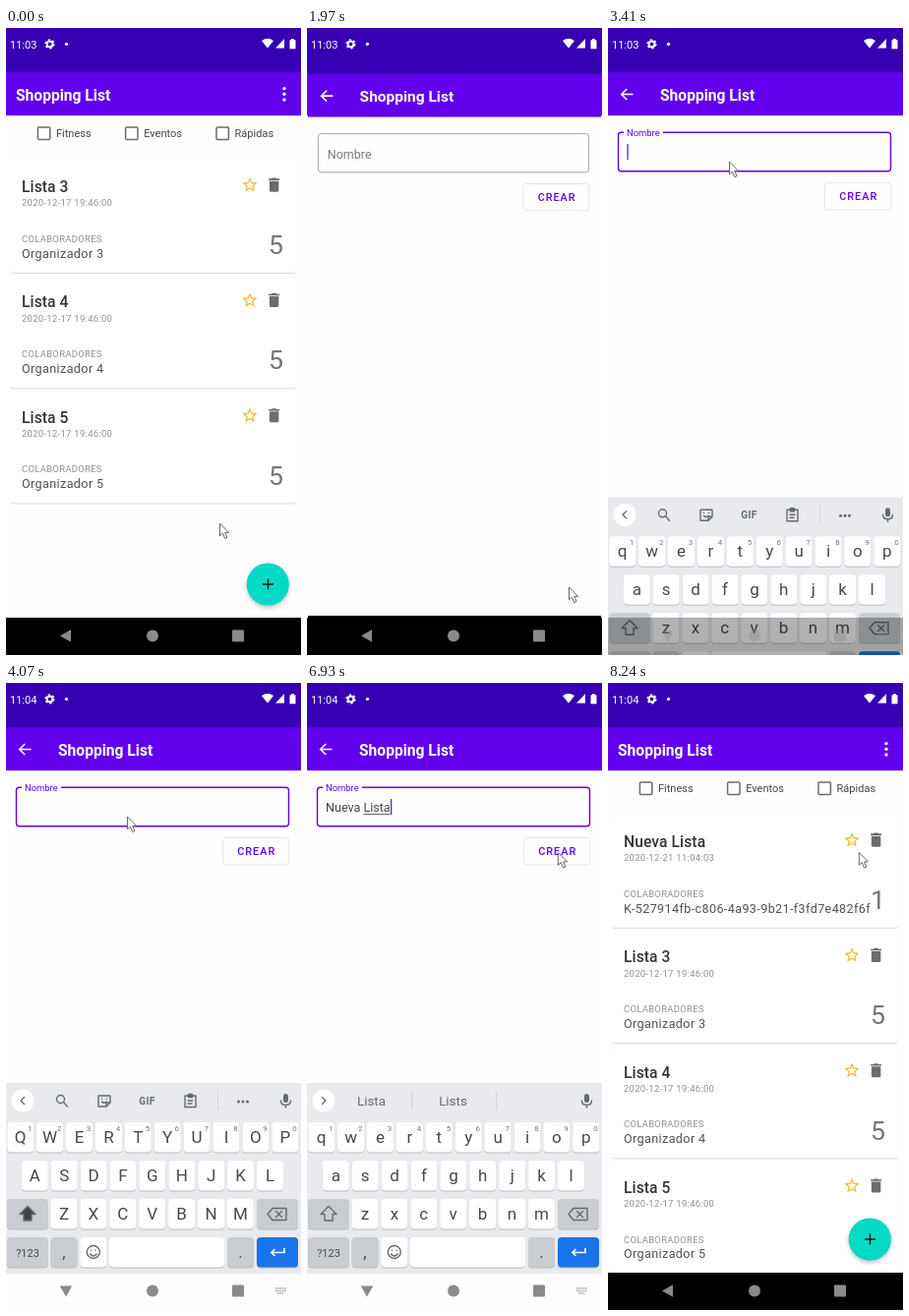
These frames come from a looping animation (300x638 px, 9320 ms). An HTML page:

```html
<!DOCTYPE html>
<html lang="es">
<head>
<meta charset="utf-8">
<title>Shopping List</title>
<style>
html, body { margin: 0; height: 100%; overflow: hidden; background: #000; }
svg { display: block; width: 100vw; height: 100vh; }
text { font-family: Roboto, sans-serif; white-space: pre; }
.scale { transform-origin: 150px 319px; }
.title { font-size: 15.6px; font-weight: 700; fill: #fff; }
.name { font-size: 15.6px; font-weight: 500; letter-spacing: .1px; fill: #333; }
.cap { font-size: 9.43px; letter-spacing: .314px; fill: #8f8f8f; }
.body { font-size: 12.57px; letter-spacing: .393px; fill: #505050; }
.num { font-size: 26.7px; fill: #757575; text-anchor: middle; }
.check { font-size: 11px; fill: #444; }
.card { fill: #fff; filter: drop-shadow(0 1px .7px #0002); }
.key rect { filter: drop-shadow(0 1px .4px #0003); }
.key text { font-size: 17px; fill: #45484c; text-anchor: middle; }
.key .hint { font-size: 8px; fill: #777; }
.sug { font-size: 13.4px; fill: #666a6f; text-anchor: middle; }
.line { fill: none; stroke: #666a6f; stroke-width: 1.4; stroke-linecap: round; stroke-linejoin: round; }
</style>
</head>
<body>
<svg id="stage" viewBox="0 0 300 638"></svg>
<script>
const LOOP = 9320, PITCH = 117.3;
const VIOLET = '#6200ee';
const stage = document.getElementById('stage');

const text = (cls, x, y, s, more = '') => `<text class="${cls}" x="${x}" y="${y}" ${more}>${s}</text>`;
const rect = (x, y, w, h, fill, more = '') =>
  `<rect x="${x}" y="${y}" width="${w}" height="${h}" fill="${fill}" ${more}/>`;
const circle = (x, y, r, fill, more = '') => `<circle cx="${x}" cy="${y}" r="${r}" fill="${fill}" ${more}/>`;
const path = (d, more = '') => `<path d="${d}" ${more}/>`;

// Window backdrop: status bar, app bar, page and navigation bar
const navBar = rect(0, 600, 300, 38, '#000');
const frame = rect(0, 0, 300, 638, '#fefefe') +
  rect(0, 45, 300, 44, VIOLET, 'style="filter:drop-shadow(0 .8px .8px #0003)"') +
  rect(0, 0, 300, 45.2, '#3700b3') + navBar;

const star = 'M22 9.24l-7.19-.62L12 2 9.19 8.63 2 9.24l5.46 4.73L5.82 21 12 17.27 18.18 21l-1.63-7.03zM12 15.4l-3.76 2.27 1-4.28-3.32-2.88 4.38-.38L12 6.1l1.71 4.04 4.38.38-3.32 2.88 1 4.28z';
const bin = 'M6 19c0 1.1.9 2 2 2h8c1.1 0 2-.9 2-2V7H6zM19 4h-3.5l-1-1h-5l-1 1H5v2h14z';

const card = (row, name, date, who, n) => `<g transform="translate(0 ${row * PITCH})">` +
  rect(4, 136, 291, 113, '#fff', 'rx="3" class="card"') +
  text('name', 16, 167, name) + text('cap', 16, 181.3, date) +
  text('cap', 16, 217.8, 'COLABORADORES') + text('body', 16, 233.6, who) + text('num', 274.5, 230, n) +
  path(star, 'fill="#f7b731" transform="translate(238.8 150.4) scale(.765)"') +
  path(bin, 'fill="#6c6c6c" transform="translate(263.2 150.2) scale(.786)"') + '</g>';

const check = (x, s) => rect(x, 101, 12.4, 12.4, 'none', 'rx="1" stroke="#6c6c6c" stroke-width="1.5"') +
  text('check', x + 18.6, 111.2, s);

const listWindow = `<g id="list" class="scale">${frame}` +
  text('title', 10, 73.5, 'Shopping List') +
  [61.6, 67.3, 73].map(y => circle(283, y, 1.7, '#fff')).join('') +
  check(32.4, 'Fitness') + check(121.6, 'Eventos') + check(214, 'Rápidas') +
  `<clipPath id="page"><rect y="90" width="300" height="510"/></clipPath><g clip-path="url(#page)">
  <g id="fresh">${card(0, 'Nueva Lista', '2020-12-21 11:04:03', 'K-527914fb-c806-4a93-9b21-f3fd7e482f6f', 1)}</g><g id="rows">` +
  [3, 4, 5].map((n, i) => card(i, 'Lista ' + n, '2020-12-17 19:46:00', 'Organizador ' + n, 5)).join('') +
  `</g></g>${rect(0, 407, 300, 193, '#fefefe', 'id="cut"')}<g id="fab">` +
  circle(266.3, 566, 21.6, '#03dac5', 'id="fabDisc"') + circle(266.3, 566, 0, '#fff', 'id="fabWave"') +
  path('M261 566h11M266.5 560.5v11', 'stroke="#111" stroke-width="1.3"') + '</g></g>';

// Keyboard
const key = (x, y, w, fill, s = '', hint = '') => `<g class="key">${rect(x - w / 2, y - 15, w, 30.5, fill, 'rx="4"')}` +
  text('', x, y + 5.8, s) + (hint && text('hint', x + 9.6, y - 6.5, hint)) + '</g>';
const row = (letters, x, y, hints = '') =>
  [...letters].map((c, i) => key(x + i * 29.9, y, 27, '#fff', c, hints[i])).join('');
const GREY = '#c9cdd2';

const tools = `<g id="tools" class="line">
  <circle cx="55.5" cy="423.5" r="4"/><path d="M58.5 426.5l4 4.5M94 420h12v7l-4 4h-8zM106 427h-4v4M97.5 426q2 2.5 4.5 0M97.5 423v.1M102.5 423v.1"/>
  <path d="M182 420h11v11.5h-11zM185.5 418.5h4v3h-4zM185 425h5M185 428h4"/>
  <path d="M215.5 416v18" stroke="#d5d8dc" stroke-width="1"/>
  <text x="143.5" y="429" text-anchor="middle" font-size="10" font-weight="700" fill="#666a6f" stroke="none" letter-spacing=".5">GIF</text>
  ${[236.5, 241, 245.5].map(x => circle(x, 426, 1.5, '#666a6f', 'stroke="none"')).join('')}</g>`;

const keyboard = `<g id="kb">${rect(0, 407, 300, 194, '#e8eaed')}${rect(0, 601, 300, 260, '#fdfdfd')}` +
  circle(17, 425, 11.5, '#fff') + path('', 'id="chevron" class="line"') + tools +
  `<g id="bar">${path('M106.5 416v18M192.5 416v18', 'stroke="#cfd2d6"')}` +
  [65.5, 148.5, 234].map(x => text('sug', x, 430, '')).join('') + '</g>' +
  rect(282, 418, 5, 9, '#666a6f', 'rx="2.5"') + path('M279.5 425q0 4.5 5 4.5t5-4.5M284.5 429.5v2.5', 'class="line"') +
  '<g id="letters">' + row('qwertyuiop', 14.7, 462, '1234567890') + row('asdfghjkl', 29.3, 501) + row('zxcvbnm', 59, 540) + '</g>' +
  key(22, 540, 42, GREY) + path('M22 532.5l-8 8h4v6.5h8v-6.5h4z', 'id="shift" class="line"') +
  key(276, 540, 42, GREY) + path('M271 534.5h14v12h-14l-5-6zM274.5 537.5l6 6M280.5 537.5l-6 6', 'class="line"') +
  `<g class="key">${rect(1, 564, 42, 30.5, GREY, 'rx="4"')}<text x="22" y="583.5" style="font-size:11px">?123</text></g>` +
  key(59, 579, 27, GREY, ',') + key(88.8, 579, 27, '#fff') +
  `<g class="line">${circle(88.8, 579, 6.5, 'none')}<path d="M85.5 581q3.3 4 6.6 0M86.5 577v.3M91 577v.3"/></g>` +
  key(163.5, 579, 117, '#fff') + key(238.5, 579, 27, GREY, '.') + key(276, 579, 42, '#1a73e8') +
  path('M283 575v4.5h-13M273.5 576l-3.6 3.5 3.6 3.5', 'fill="none" stroke="#fff" stroke-width="1.7"') + '</g>';

const addWindow = `<g id="add" class="scale">${frame}` +
  path('M25.5 67.5H14M19.2 62L13.7 67.5l5.5 5.5', 'fill="none" stroke="#fff" stroke-width="1.6"') +
  text('title', 53, 73.5, 'Shopping List') +
  rect(10.5, 106.2, 277, 39.5, 'none', 'rx="3" id="field"') + rect(0, 104, 0, 5, '#fefefe', 'id="gap"') +
  text('', 0, 0, 'Nombre', 'id="label" font-size="12.57"') +
  text('', 19, 131, '', 'id="input" font-size="12.57" fill="#444"') +
  path('', 'id="under" stroke="#555" stroke-width=".9"') + rect(0, 118, 1.2, 16, '#4a1fb0', 'id="caret"') +
  rect(220.5, 157.5, 67.3, 27.5, '#fefefe', 'rx="3" stroke="#e6e6e8"') +
  rect(221, 158, 66.3, 26.5, VIOLET, 'rx="3" id="press"') +
  text('', 235.3, 175.4, 'CREAR', `font-size="10.9" font-weight="500" letter-spacing=".95" fill="${VIOLET}"`) +
  keyboard + rect(0, 600, 300, 38, '#000', 'id="shade"') + '</g>';

const system = text('', 4, 20.6, '', 'id="clock" font-size="11" fill="#fff"') +
  circle(44.5, 16.3, 2.9, 'none', 'stroke="#fff" stroke-width="2"') +
  circle(44.5, 16.3, 4.4, 'none', 'stroke="#fff" stroke-width="1.4" stroke-dasharray="2.3 2.3"') +
  circle(61.5, 16.3, 1.6, '#fff') +
  path('M260 13Q266 8.6 272 13L266 20.5zM274 20.5h9v-9.5zM288.5 12.3h1.5v-1.3h3v1.3h1.5v9h-6z', 'fill="#fff"') +
  '<g id="nav" fill="#8a8a8a">' + path('M55 618.5L66 612.3v12.4z', 'id="back"') + circle(149, 618.5, 6, '#8a8a8a') +
  rect(230, 612.5, 12, 12, '#8a8a8a', 'rx="1"') +
  path('M274 616h11M274 618.5h11M276 621h7', 'id="kbIcon" stroke="#aaa" stroke-width="1.6" stroke-dasharray="1.6 .7"') + '</g>' +
  path('M0 0V12.8L3 10.2 5.2 15.6 7.5 14.6 5.2 9.4H9.2z', 'id="mouse" fill="#fff" stroke="#555" stroke-width=".9"');

stage.innerHTML = frame + listWindow + navBar + addWindow + system;
const el = {};
for (const e of stage.querySelectorAll('[id]')) el[e.id] = e;
const words = el.bar.querySelectorAll('text');

const clamp = v => Math.max(0, Math.min(1, v));
const span = (t, from, length) => clamp((t - from) / length);
const out = (p, power) => 1 - (1 - p) ** power;
const show = (e, on) => e.style.display = on ? '' : 'none';
const set = (e, attrs) => { for (const k in attrs) e.setAttribute(k, attrs[k]); };
const opening = t => out(span(t, 1690, 400), 2.6);
const closing = t => out(span(t, 7870, 340), 1.5);

const typed = 'Nueva Lista';
const strokes = [4180, 4290, 4510, 4620, 4730, 4840, 4950, 5060, 5170, 5390, 5500];
const route = [[50, 217.5, 504], [770, 266.5, 569], [2130, 266.5, 569], [2630, 123.5, 136],
  [6090, 123.5, 136], [6700, 267, 174], [6920, 255.3, 172.5]];

function mouseAt(t) {
  let i = 0;
  while (i < route.length - 2 && t > route[i + 1][0]) i++;
  const [a, b] = [route[i], route[i + 1]];
  const p = span(t, a[0], b[0] - a[0]), e = p * p * (3 - 2 * p);
  return [a[1] + (b[1] - a[1]) * e, a[2] + (b[2] - a[2]) * e];
}

function suggestions(word, t) {
  if (t > 5690) return ['Lista', 'Lists', ''];
  if (!word) return ['de', 'lista', 'y'];
  return word[0] === 'N' ? [word, 'Nueva', 'Nuevo'] : [word, 'Lista', 'Lists'];
}

function drawList(t) {
  const back = t > 7870;
  const s = back ? 1 + .098 * (1 - closing(t)) : 1 + .15 * opening(t);
  const resized = back && t < 8000, updated = t > 8200;
  show(el.list, back || t < 1900);
  el.list.style.transform = `scale(${s})`;
  show(el.fresh, updated);
  set(el.rows, { transform: `translate(0 ${updated ? PITCH : 0})` });
  show(el.cut, resized);
  set(el.fab, { transform: `translate(0 ${resized ? -192 : 0})` });
  const p = span(t, 1050, 480), lift = Math.sin(p * Math.PI);
  el.fabDisc.style.filter = `drop-shadow(0 ${2 + 2 * lift}px ${2 + lift}px #0004)`;
  set(el.fabWave, { r: 21.6 * Math.min(1, p * 2), opacity: .3 * lift });
}

function drawAdd(t) {
  const alpha = t < 7870 ? span(t, 1725, 50) : 1 - span(t, 7890, 65);
  show(el.add, alpha > 0);
  el.add.style.transform = `scale(${(.85 + .15 * opening(t)) * (1 - .09 * closing(t))})`;
  el.add.style.opacity = alpha;

  const p = out(span(t, 2700, 260), 2), focus = p > 0;
  set(el.field, { stroke: focus ? VIOLET : '#a4a4ac', 'stroke-width': focus ? 1.4 : 1 });
  set(el.gap, { x: 36 - 20 * p, width: 40 * p });
  set(el.label, { transform: `translate(${20 - p} ${131.4 - 21.6 * p}) scale(${1 - .25 * p})`, fill: focus ? VIOLET : '#7c7c7c' });

  const count = strokes.filter(s => s <= t + 40).length;
  const value = typed.slice(0, count), cut = value.indexOf(' ') + 1, word = value.slice(cut);
  el.input.textContent = value;
  const end = 19 + (count ? el.input.getSubStringLength(0, count) : 0);
  const start = 19 + (cut ? el.input.getSubStringLength(0, cut) : 0);
  set(el.under, { d: word ? `M${start} 133.5H${end}` : '' });
  set(el.caret, { x: end + .4 });
  show(el.caret, t > 3040 && !(t > 4040 && t < 4150) && !(t > 6420 && t < 6900) && t < 7460);
  const press = span(t, 7500, 180);
  set(el.press, { opacity: .14 * Math.sin(press * Math.PI) });

  // Keyboard slides in while the navigation bar turns light
  const k = t < 8000 ? out(span(t, 3270, 290), 2) : 0;
  const upper = t > 3600 && !count;
  show(el.kb, k > 0);
  set(el.kb, { transform: `translate(0 ${231 * (1 - k)})` });
  set(el.shade, { opacity: 1 - k });
  el.letters.style.textTransform = upper ? 'uppercase' : 'none';
  el.shift.style.fill = upper ? '#444' : 'none';
  show(el.tools, !count);
  show(el.bar, count);
  set(el.chevron, { d: count ? 'M15.5 421.5l3.5 3.5-3.5 3.5' : 'M18.5 421.5l-3.5 3.5 3.5 3.5' });
  suggestions(word, t).forEach((s, i) => words[i].textContent = s);

  set(el.nav, { opacity: Math.abs(2 * k - 1) });
  set(el.back, { transform: k > .5 ? 'rotate(-90 61 618.5)' : '' });
  show(el.kbIcon, k > .5);
}

function draw(t) {
  drawList(t);
  drawAdd(t);
  el.clock.textContent = t > 3810 ? '11:04' : '11:03';
  set(el.mouse, { transform: `translate(${mouseAt(t)})` });
}

// The screen refreshes every 110 ms after a first 100 ms hold
const begin = performance.now();
function tick() {
  const t = (performance.now() - begin) % LOOP;
  draw(t < 100 ? 0 : 100 + Math.floor((t - 100) / 110) * 110);
  requestAnimationFrame(tick);
}
tick();
</script>
</body>
</html>
```
